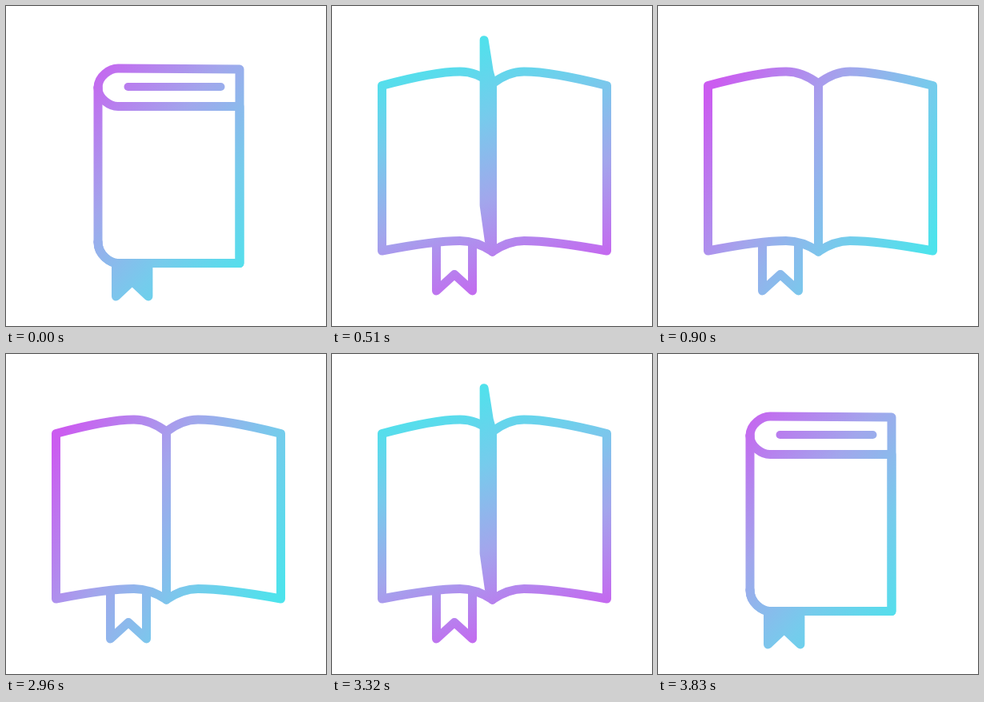
An HTML page with a canvas for the animation above (4860 ms loop, 400 by 400 pixels).

```html
<!DOCTYPE html>
<html lang="en">
<head>
<meta charset="utf-8">
<title>Opening book</title>
<style>
html, body { margin: 0; width: 100%; height: 100%; overflow: hidden; background: #fff; }
canvas { display: block; width: 400px; height: 400px; }
</style>
</head>
<body>
<canvas id="stage" width="400" height="400"></canvas>
<script>
const ctx = document.getElementById('stage').getContext('2d');
const LOOP = 4860, OPEN = 900, CLOSED_AT = 3830, STEP = 30, TURN = 360;
const FLIPS = [319.5, 510];

// Each resting page lists its hinge, knee and corner, from spine to outer edge.
const back = { x: [115, 140, 292], top: [102, 78, 79], bottom: [295, 321.5, 321.5] };
const lid = { ...back, top: [102, 125.5, 125.5] };
const right = { x: [200.5, 240, 343.5], top: [97, 82, 99.5], bottom: [307, 293.5, 306] };
const left = { ...right, x: [200.5, 160, 62.5] };

const mix = (a, b, k) => a + (b - a) * k;
const swing = u => (1 - Math.cos(Math.PI * u)) / 2;
const arch = u => Math.sin(Math.PI * u);

// Moves the hinge by `slide`, and the rest of the page by `turn` with an added lift.
function blend(from, to, slide, turn, lift = [0, 0, 0], drift = 0) {
  const along = (key, offset) => from[key].map((v, i) =>
    mix(v, to[key][i], i ? turn : slide) + offset(i));
  return {
    x: along('x', i => i ? drift : 0),
    top: along('top', i => -lift[i]),
    bottom: along('bottom', i => -lift[i])
  };
}

// Curve from hinge over knee to corner; `straight` flattens it into a line.
function edge([hx, kx, cx], [hy, ky, cy], bend, straight) {
  const dx = kx - hx, dy = ky - hy, ex = cx - kx, ey = cy - ky;
  ctx.moveTo(hx, hy);
  ctx.bezierCurveTo(hx + bend * dx, hy + .6 * dy,
    kx - .4 * dx, ky - .4 * dy * straight, kx, ky);
  ctx.bezierCurveTo(kx + .28 * ex, ky + .28 * ey * straight,
    cx - .3 * ex, cy - mix(.45, .3, straight) * ey, cx, cy);
}

function drawPage({ x, top, bottom }, bend, straight = 0) {
  ctx.beginPath();
  edge(x, bottom, bend, straight);
  edge(x, top, bend, straight);
  ctx.lineTo(x[2], bottom[2]);
  ctx.stroke();
}

function drawLine(points, filled) {
  ctx.beginPath();
  points.forEach(([x, y]) => ctx.lineTo(x, y));
  if (filled) ctx.fill();
  ctx.stroke();
}

function drawRibbon(k, turn, bulge) {
  const x = mix(157.7, 153, k) + 8 * bulge;
  const half = mix(20.2, 22.5, k) * Math.abs(Math.cos(Math.PI * turn));
  const top = mix(322, 297, k), end = mix(363, 356, k), notch = mix(344, 335.5, k);
  drawLine([[x - half, top], [x - half, end], [x, notch], [x + half, end], [x + half, top]],
    turn < .5);
}

function drawFlip(u) {
  if (u <= 0 || u >= 1) return;
  const s = arch(u);
  drawPage(blend(right, left, 0, swing(u), [0, 0, 57 * s]), .3 + .3 * s, s);
}

function setColour(t) {
  const angle = (40 + 350 * swing(t / OPEN)) * Math.PI / 180;
  const x = 168 * Math.cos(angle), y = 168 * Math.sin(angle);
  const gradient = ctx.createLinearGradient(203 - x, 205 - y, 203 + x, 205 + y);
  gradient.addColorStop(0, '#cb5cf0');
  gradient.addColorStop(.4, '#a2a6ec');
  gradient.addColorStop(.7, '#76cbec');
  gradient.addColorStop(1, '#4de3ec');
  ctx.strokeStyle = ctx.fillStyle = gradient;
}

function draw(t) {
  const u = Math.min(1, t / TURN), k = swing(u), bulge = arch(u);
  const turn = u ** 1.25, lift = arch(turn);
  const body = blend(back, right, k, k);
  const cover = blend(lid, left, k, swing(turn), [0, 30 * lift, 38 * lift], 12 * lift);
  const hinge = body.x[0], fold = hinge - 18 * bulge;

  ctx.clearRect(0, 0, 400, 400);
  setColour(t);
  ctx.lineWidth = 11;
  ctx.lineCap = ctx.lineJoin = 'round';
  drawRibbon(k, turn, bulge);
  drawPage(body, .3 * k);
  drawPage(cover, .3 * k);
  drawLine([[hinge, body.bottom[0]], [hinge, body.top[0]],
    [fold, body.top[0] + 3 * bulge], [fold, body.bottom[0] + 22 * bulge]]);
  FLIPS.forEach(start => drawFlip((t - start) / TURN));
  if (turn < .5) {
    ctx.lineWidth = 10;
    drawLine([[152.5 + 83 * k, 101 - 32 * k], [268.5 + 50 * k, 101 - 20 * k]]);
  }
}

function frame(now) {
  const time = now % LOOP;
  const opening = Math.floor(time / STEP) * STEP;
  const closing = Math.ceil((CLOSED_AT - time) / STEP) * STEP;
  draw(Math.max(0, Math.min(opening, closing, OPEN)));
  requestAnimationFrame(frame);
}
frame(0);
</script>
</body>
</html>
```
